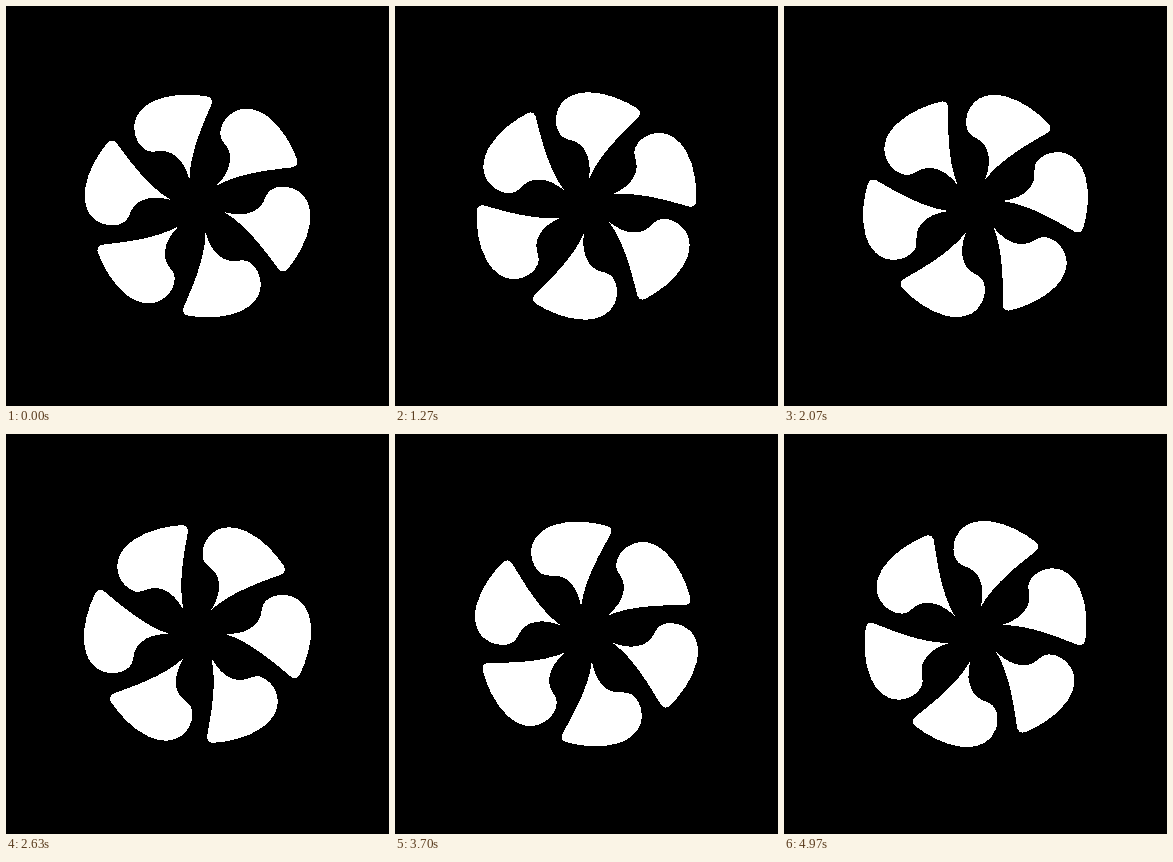
An HTML page for the animation above (5010 ms loop, 383 by 400 pixels).

```html
<!DOCTYPE html>
<html lang="en">
<head>
<meta charset="utf-8">
<title>Spinning fan</title>
<style>
  html, body { margin: 0; width: 100%; height: 100%; overflow: hidden; background: #000; }
  svg { display: block; width: 383px; height: 400px; }
</style>
</head>
<body>
<svg viewBox="0 0 383 400" fill="#fff" shape-rendering="crispEdges">
  <defs>
    <path id="blade" d="M2.6-27.5C4-40 3-49-3-57.5C-11-68-20-64-26-71C-31-77-31.5-86-30-92C-27-107-13-113.7 2-113.7C20-113.7 39-105 50-98C54-95.5 54.5-92.5 52-89C38-75 13.3-52.7 2.6-27.5Z"/>
  </defs>
  <g id="fan"></g>
</svg>
<script>
  const LOOP = 5010, FPS = 30, START = -22.4, STEP = 0.592; // degrees
  const fan = document.getElementById('fan');

  fan.innerHTML = Array.from({ length: 6 }, (_, i) =>
    `<use href="#blade" transform="rotate(${i * 60})"/>`).join('');

  function draw(now) {
    const t = Math.max(0, now) % LOOP;
    const step = Math.min(149, Math.floor((t + 3.4) * FPS / 1000));
    fan.setAttribute('transform', `translate(191.5 200) rotate(${START + step * STEP})`);
  }

  function tick() {
    draw(performance.now());
    requestAnimationFrame(tick);
  }
  draw(0);
  requestAnimationFrame(tick);
</script>
</body>
</html>
```
